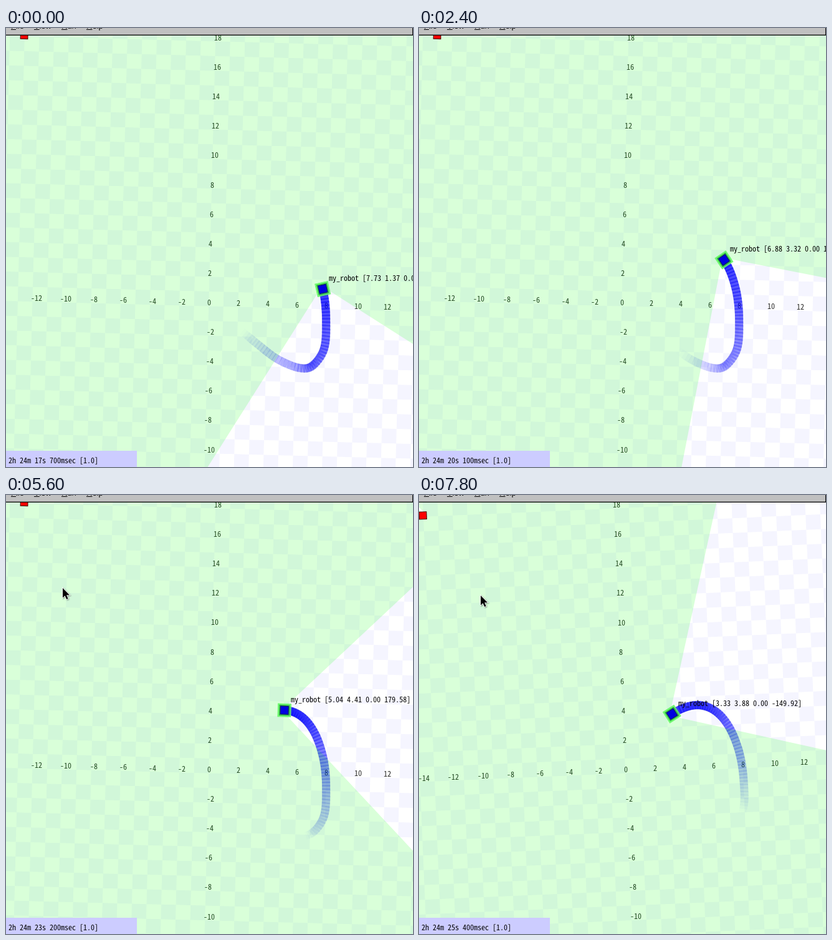
Animation, 653 px wide and 703 px high, one loop 8000 ms. Source, as an HTML page with a canvas:

```html
<!DOCTYPE html>
<html lang="en">
<head>
<meta charset="utf-8">
<title>Robot simulation</title>
<style>
  html, body { margin: 0; width: 100%; height: 100%; overflow: hidden; background: #d9ffd9; }
  canvas { display: block; }
</style>
</head>
<body>
<canvas id="stage" width="653" height="703"></canvas>
<script>
const W = 653, H = 703, LOOP = 8000, STEP = 100;
const ctx = document.getElementById('stage').getContext('2d');
const MONO = '12px "Noto Sans Mono CJK JP", "DejaVu Sans Mono", monospace';
const MENU = '13px "Liberation Sans", Arial, sans-serif';
const RAD = Math.PI / 180, SCALE = 23.57, TILT = 1.475;
const TRAIL_AGE = 12.5, TRAIL_STEP = 0.25;
const BOX = { x: -13.03, y: 18.08 };
const LASER = { rays: 181, fov: 270, range: 30, front: 0.19, hit: 0.378 };

// seconds, x, y, heading in degrees
const ROUTE = [
  [-14, 1.3, -0.85, -39], [-12.5, 2.37, -1.69, -38], [-11, 3.365, -2.47, -36],
  [-9, 4.965, -3.57, -28], [-7.8, 6.165, -4.01, -10], [-7, 6.8, -4.035, 10],
  [-6, 7.3, -3.725, 42], [-4.8, 7.83, -2.95, 71], [-2.3, 8.01, -0.69, 91],
  [0, 7.73, 1.37, 104.1], [1.5, 7.26, 2.68, 115.5], [3.5, 6.32, 3.93, 141.2],
  [4.7, 5.59, 4.32, 163.8], [5.5, 5.04, 4.41, 179.58], [6.5, 4.29, 4.3, 196.33],
  [7.7, 3.33, 3.88, 210.08], [8.9, 2.33, 3.17, 221]
];

// milliseconds, x, y of the pointer tip
const POINTER = [
  [3000, 0, 172], [3300, 84, 152], [3700, 84, 152], [4000, 91, 149],
  [6500, 91, 149], [6600, 90, 150], [6900, 90, 150], [7600, 99, 161], [8000, 99, 161]
];

function slope(i, k) {
  const [a, b, c] = [ROUTE[i - 1] || ROUTE[i], ROUTE[i], ROUTE[i + 1] || ROUTE[i]];
  const left = b[0] - a[0], right = c[0] - b[0];
  if (!left) return (c[k] - b[k]) / right;
  if (!right) return (b[k] - a[k]) / left;
  return ((b[k] - a[k]) / left * right + (c[k] - b[k]) / right * left) / (left + right);
}

function pose(s) {
  let i = 0;
  while (i < ROUTE.length - 2 && ROUTE[i + 1][0] <= s) i++;
  const a = ROUTE[i], b = ROUTE[i + 1], d = b[0] - a[0], u = (s - a[0]) / d;
  const [x, y, h] = [1, 2, 3].map(k =>
    a[k] * (1 + 2 * u) * (1 - u) ** 2 + b[k] * u * u * (3 - 2 * u) +
    d * (slope(i, k) * u * (1 - u) ** 2 - slope(i + 1, k) * u * u * (1 - u)));
  return { x, y, h };
}

function pointerAt(t) {
  if (t < POINTER[0][0]) return null;
  let i = 0;
  while (i < POINTER.length - 2 && POINTER[i + 1][0] <= t) i++;
  const a = POINTER[i], b = POINTER[i + 1], u = (t - a[0]) / (b[0] - a[0]);
  return { x: Math.round(a[1] + (b[1] - a[1]) * u), y: Math.round(a[2] + (b[2] - a[2]) * u) };
}

function makeView(tilt) {
  const c = Math.cos(tilt * RAD), n = Math.sin(tilt * RAD);
  const ox = 325.2 - 1.54 * (tilt - TILT), oy = 445.5;
  return {
    at: (x, y) => [ox + SCALE * (x * c + y * n), oy + SCALE * (x * n - y * c)],
    enter: () => ctx.setTransform(SCALE * c, SCALE * n, SCALE * n, -SCALE * c, ox, oy)
  };
}

const reset = () => ctx.setTransform(1, 0, 0, 1, 0, 0);

function rect(x, y, w, h, color) {
  ctx.fillStyle = color;
  ctx.fillRect(x, y, w, h);
}

function text(str, x, y, color = '#000') {
  ctx.font = MONO;
  ctx.letterSpacing = '0px';
  ctx.letterSpacing = 6 - ctx.measureText('0').width + 'px';
  ctx.fillStyle = color;
  ctx.fillText(str, x, y);
}

// square in world units, turned to a heading
function square(p, size, fill, stroke) {
  ctx.save();
  ctx.translate(p.x, p.y);
  ctx.rotate((p.h || 0) * RAD);
  rect(-size / 2, -size / 2, size, size, fill);
  if (stroke) {
    ctx.strokeStyle = stroke;
    ctx.lineWidth = 1 / SCALE;
    ctx.strokeRect(-size / 2, -size / 2, size, size);
  }
  ctx.restore();
}

function drawFloor(view) {
  rect(0, 0, W, H, '#fff');
  view.enter();
  for (let x = -17; x < 17; x++)
    for (let y = -13; y < 21; y++)
      if ((x + y) & 1) rect(x, y, 1, 1, '#f5f5ff');
  reset();
}

function drawAxes(view) {
  const label = (n, x, y) => {
    const [px, py] = view.at(x, y);
    if (px > 0) text(String(n), Math.round(px - 2.2), Math.round(py - 1.5), 'rgba(0,0,0,.85)');
  };
  for (let n = -14; n <= 12; n += 2) label(n, n, 0);
  for (let n = -10; n <= 18; n += 2) if (n) label(n, 0, n);
}

function drawTrail(view, s) {
  view.enter();
  const first = Math.ceil((s - TRAIL_AGE) / TRAIL_STEP);
  for (let i = first; i * TRAIL_STEP <= s; i++) {
    const age = s - i * TRAIL_STEP, a = 1 - age / TRAIL_AGE;
    square(pose(i * TRAIL_STEP), 0.54, `rgba(0,0,255,${0.52 * a})`, `rgba(0,0,200,${0.13 * a})`);
  }
  reset();
}

function drawLaser(view, p) {
  const x = p.x + LASER.front * Math.cos(p.h * RAD), y = p.y + LASER.front * Math.sin(p.h * RAD);
  const bx = BOX.x - x, by = BOX.y - y;
  view.enter();
  ctx.beginPath();
  ctx.moveTo(x, y);
  for (let i = 0; i < LASER.rays; i++) {
    const a = (p.h + LASER.fov * (i / (LASER.rays - 1) - 0.5)) * RAD;
    const c = Math.cos(a), n = Math.sin(a);
    const along = bx * c + by * n, off = bx * n - by * c;
    const blocked = along > 0 && Math.abs(off) < LASER.hit;
    const r = blocked ? along - Math.sqrt(LASER.hit ** 2 - off ** 2) : LASER.range;
    ctx.lineTo(x + r * c, y + r * n);
  }
  ctx.fillStyle = 'rgba(0,255,0,.15)';
  ctx.fill();
  reset();
}

function drawRobot(view, p) {
  view.enter();
  square(BOX, 0.5, '#f00', '#400');
  square(p, 0.88, 'rgba(90,255,90,.8)', '#6bf56b');
  square(p, 0.68, 'rgba(0,90,60,.35)', '#2aa83c');
  square(p, 0.54, '#0000e0', '#000070');
  reset();
  const [px, py] = view.at(p.x, p.y);
  const h = p.h > 180 ? p.h - 360 : p.h;
  const values = [p.x, p.y, 0, h].map(v => v.toFixed(2)).join(' ');
  text(`my_robot [${values}]`, Math.round(px + 10), Math.round(py - 13));
}

function drawStatus(s) {
  rect(0, 677, 210, 26, '#ccccff');
  const ms = Math.round((s + 17.7) * 10) * 100;
  text(`2h 24m ${Math.floor(ms / 1000)}s ${ms % 1000}msec [1.0]`, 4, 697);
}

function drawMenu() {
  rect(0, 0, W, 11, '#c0c0c0');
  rect(0, 10, W, 1, '#8c8c8c');
  rect(0, 11, W, 1, '#000');
  rect(652, 0, 1, 11, '#000');
  ctx.font = MENU;
  ctx.letterSpacing = '0px';
  ctx.fillStyle = '#000';
  [['File', 8], ['View', 45], ['Run', 89], ['Help', 129]].forEach(([word, x]) => {
    ctx.fillText(word, x, 1);
    ctx.fillRect(x, 2, ctx.measureText(word[0]).width, 1);
  });
}

function drawPointer(p) {
  const arrow = new Path2D('M0 0V15.5L3.6 12.2L6.2 18L8.6 17L6.1 11.3H11Z');
  ctx.save();
  ctx.translate(p.x, p.y);
  ctx.shadowColor = 'rgba(0,0,0,.4)';
  ctx.shadowBlur = 2;
  ctx.shadowOffsetX = ctx.shadowOffsetY = 1;
  ctx.strokeStyle = '#fff';
  ctx.lineWidth = 1.6;
  ctx.stroke(arrow);
  ctx.shadowColor = 'transparent';
  ctx.fillStyle = '#000';
  ctx.fill(arrow);
  ctx.restore();
}

function draw(t) {
  // the simulation stalls briefly, then resumes a tick behind
  const s = (t < 3000 ? Math.min(t, 2400) : t - 100) / 1000;
  const pointer = pointerAt(t);
  const tilt = t < 5700 ? TILT : TILT - 0.49 * (pointer.x - 91);
  const view = makeView(tilt), robot = pose(s);
  drawFloor(view);
  drawAxes(view);
  drawTrail(view, s);
  drawLaser(view, robot);
  drawRobot(view, robot);
  drawStatus(s);
  drawMenu();
  if (pointer) drawPointer(pointer);
}

let shown = -1;
function tick() {
  const t = Math.min(Math.floor(performance.now() % LOOP / STEP) * STEP, 7800);
  if (t !== shown) draw(shown = t);
  requestAnimationFrame(tick);
}
tick();
</script>
</body>
</html>
```
